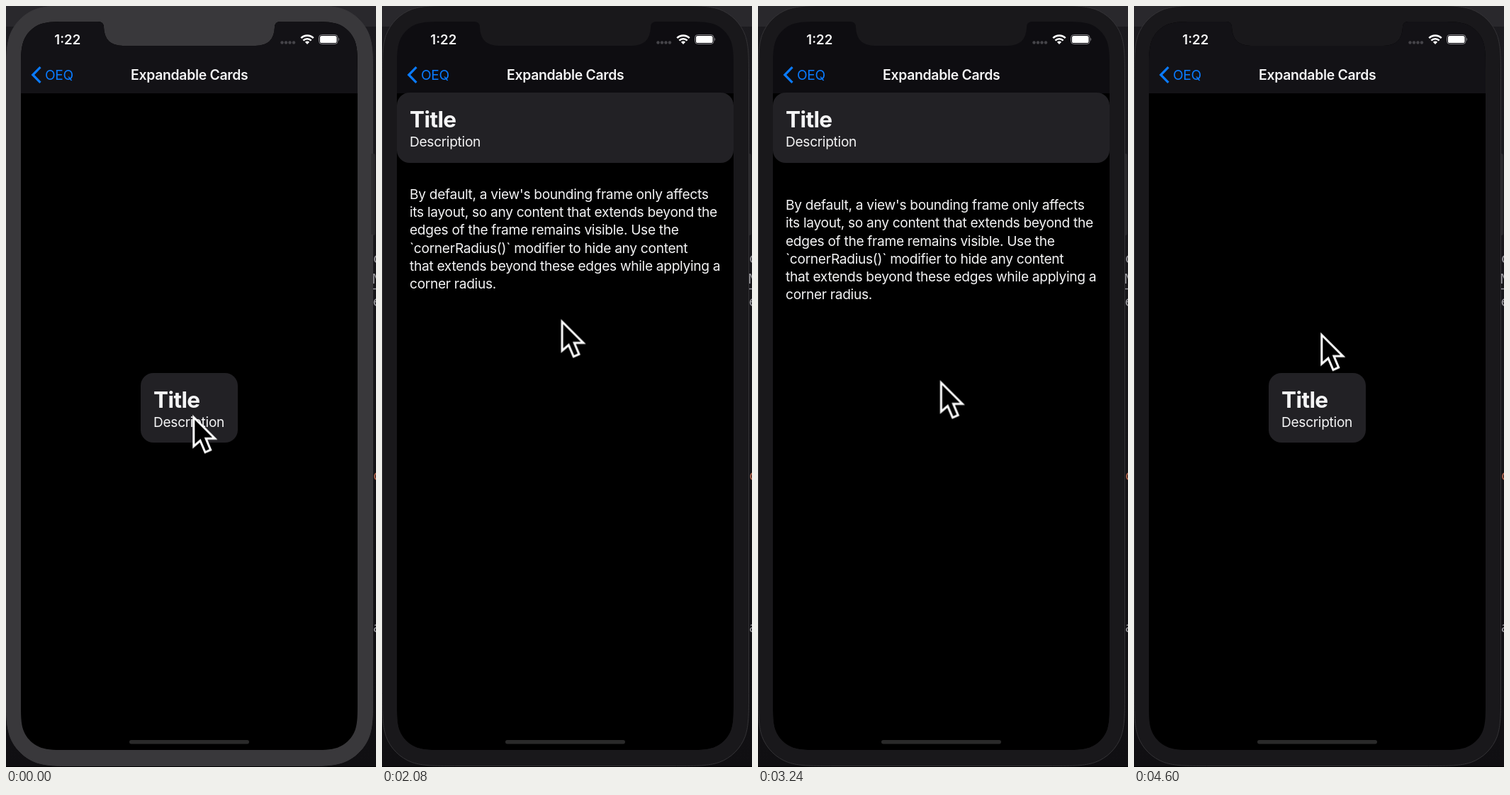
Animation of 522 by 1072 pixels, one loop 4720 ms. Source, as an HTML page:

```html
<!DOCTYPE html>
<html lang="en">
<head>
<meta charset="utf-8">
<title>Expandable Cards</title>
<style>
  html, body { margin: 0; width: 100%; height: 100%; overflow: hidden; background: #141316; }
  #stage { position: absolute; left: 0; top: 0; width: 522px; height: 1072px; overflow: hidden; }
  svg { position: absolute; left: 0; top: 0; display: block; }
  text { font-family: Inter, "Liberation Sans", sans-serif; font-size: 19.15px; letter-spacing: -.016em; fill: #f4f4f5; white-space: pre; }
  .semi { font-weight: 600; font-size: 19.4px; }
  .mono text { font-family: "Noto Sans Mono", "DejaVu Sans Mono", monospace; font-size: 20px; fill: #98979c; letter-spacing: 0; }

  .active, .card, .fade, .body, .cursor, .ring { animation: 4720ms linear infinite; }

  .active { animation-name: blur; animation-timing-function: step-end; }
  @keyframes blur { 0% { opacity: 1 } 11.01%, 100% { opacity: 0 } }

  .card { position: absolute; overflow: hidden; animation-name: expand; }
  .head { position: absolute; left: 0; top: 0; width: 100%; height: 98.5px; border-radius: 18px; background: #222125; }
  @keyframes expand {
    0%, 97.25%, 100% { left: 190px; top: 516.5px; width: 137px; height: 98.5px; }
    12.99% { left: 190px; top: 516.5px; width: 137px; height: 98.5px; animation-timing-function: ease-in-out; }
    20.4% { left: 21px; top: 122.3px; width: 475px; height: 925.7px; }
    89.83% { left: 21px; top: 122.3px; width: 475px; height: 925.7px; animation-timing-function: ease-in-out; }
  }

  .fade { animation-name: fade; }
  @keyframes fade {
    0%, 97.25%, 100% { opacity: 0; }
    12.99% { opacity: 0; animation-timing-function: ease-in-out; }
    20.4% { opacity: 1; }
    89.83% { opacity: 1; animation-timing-function: ease-in-out; }
  }

  /* rubber-band drag, then spring back */
  .body { animation-name: drag; }
  @keyframes drag {
    0%, 48.7% { transform: translateY(0); }
    51.69% { transform: translateY(-1.3px); animation-timing-function: cubic-bezier(.45, 0, .7, .9); }
    62.71% { transform: translateY(67.7px); }
    63.56% { transform: translateY(70px); animation-timing-function: linear(0, .25, .57, .78, .896, .952, .978, 1); }
    75.42%, 100% { transform: translateY(0); }
  }

  .cursor { animation-name: point; }
  @keyframes point {
    0% { transform: translate(263px, 575.3px); animation-timing-function: ease-in-out; }
    3.39% { transform: translate(251px, 574.5px); }
    27.97% { transform: translate(251px, 574.5px); animation-timing-function: ease-in; }
    31.36% { transform: translate(251px, 562.5px); animation-timing-function: cubic-bezier(.3, .2, .5, 1); }
    50.85% { transform: translate(252.5px, 419.5px); }
    51.69% { transform: translate(252.5px, 419.5px); animation-timing-function: cubic-bezier(.45, 0, .7, .9); }
    62.71% { transform: translate(252px, 565.5px); }
    63.56% { transform: translate(252.5px, 568px); animation-timing-function: ease-in-out; }
    75.42%, 100% { transform: translate(263px, 459.2px); }
  }

  .ring { animation-name: ripple; transform-origin: 245.5px 563.5px; }
  .ring circle { vector-effect: non-scaling-stroke; }
  @keyframes ripple {
    0%, 61.44% { opacity: 0; transform: scale(.5); }
    62.5% { opacity: 1; }
    62.71% { opacity: 1; transform: scale(1); }
    64.4%, 100% { opacity: 0; transform: scale(1.2); }
  }
</style>
</head>
<body>
<div id="stage">
  <svg width="522" height="1072" viewBox="0 0 522 1072">
    <defs>
      <linearGradient id="desk" x2="0" y2="1">
        <stop stop-color="#1c1b1f"/><stop offset="1" stop-color="#100f12"/>
      </linearGradient>
      <clipPath id="screen"><path id="glass" clip-rule="evenodd"/></clipPath>
    </defs>

    <!-- window behind the phone -->
    <rect width="522" height="1072" fill="url(#desk)"/>
    <rect width="522" height="29" fill="#29282c"/>
    <rect y="1071" width="522" height="1" fill="#000"/>
    <g class="mono">
      <text x="517.5" y="362">c</text>
      <text x="516.5" y="391">N</text>
      <text x="517.5" y="423">e</text>
      <text x="517.5" y="668" style="fill:#b5674f">c</text>
      <text x="517.5" y="882">a</text>
      <path d="M516 398.5H522" stroke="#98979c" stroke-width="1.5"/>
    </g>
    <rect x="514" y="208" width="7" height="115" rx="2" fill="#29282b"/>

    <!-- bezel -->
    <path class="bezel" fill="#19181b" stroke="#343336"/>
    <g class="active">
      <path class="bezel" fill="#39383b" stroke="#39383b"/>
      <path d="M516.5 208V322" stroke="#2b2a2d" stroke-width="2"/>
    </g>

    <!-- screen -->
    <g clip-path="url(#screen)">
      <rect x="21" y="22" width="475" height="1026" fill="#000"/>
      <rect x="21" y="22" width="475" height="101" fill="#131216"/>
      <rect class="fade" x="21" y="22" width="475" height="101" fill="#0e0d11"/>
    </g>

    <!-- status bar -->
    <text class="semi" x="68.3" y="53.7" style="font-size:18.6px;letter-spacing:0">1:22</text>
    <g fill="#454449">
      <circle cx="389.5" cy="51.5" r="2.2"/><circle cx="395" cy="51.5" r="2.2"/>
      <circle cx="400.5" cy="51.5" r="2.2"/><circle cx="406" cy="51.5" r="2.2"/>
    </g>
    <g fill="none" stroke="#fff" stroke-width="2.6">
      <path d="M416.3 45.2A12.3 12.3 0 0 1 433.7 45.2"/>
      <path d="M419.4 48.6A8 8 0 0 1 430.6 48.6"/>
    </g>
    <path d="M425 54L421.9 50.8A4.4 4.4 0 0 1 428.1 50.8Z" fill="#fff"/>
    <rect x="441.5" y="40.5" width="26.5" height="13" rx="4" fill="none" stroke="#858489"/>
    <rect x="443" y="42" width="23.5" height="10" rx="2.6" fill="#fff"/>
    <path d="M469.3 44.8Q471.2 47 469.3 49.2Z" fill="#858489"/>

    <!-- navigation bar -->
    <path d="M48.5 86.2L37.8 97L48.5 107.8" fill="none" stroke="#0a7bff" stroke-width="3.2"/>
    <text x="55" y="104" style="fill:#0a7bff">OEQ</text>
    <text class="semi" x="258.7" y="104" text-anchor="middle">Expandable Cards</text>
  </svg>

  <div class="card">
    <div class="head"></div>
    <svg width="475" height="926" viewBox="0 0 475 926">
      <text x="18" y="49.3" style="font-size:31.6px;font-weight:700;letter-spacing:-.02em">Title</text>
      <text x="18" y="75.7">Description</text>
      <g class="fade">
        <g class="body">
          <text x="18" y="149.9">By default, a view's bounding frame only affects</text>
          <text x="18" y="175.1">its layout, so any content that extends beyond the</text>
          <text x="18" y="200.3">edges of the frame remains visible. Use the</text>
          <text x="18" y="225.5">`cornerRadius()` modifier to hide any content</text>
          <text x="18" y="250.7">that extends beyond these edges while applying a</text>
          <text x="18" y="275.9">corner radius.</text>
        </g>
      </g>
    </svg>
  </div>

  <svg width="522" height="1072" viewBox="0 0 522 1072">
    <rect x="174" y="1034" width="169" height="5.5" rx="2.75" fill="#2a2a2a"/>
    <g class="ring" fill="none" stroke="#d8d8d8">
      <circle cx="245.5" cy="563.5" r="70.5"/>
      <circle cx="245.5" cy="563.5" r="67.5"/>
    </g>
    <path class="cursor" d="M1.8 4V45L11 37L18 53.3L25.7 50L19 34H31.8Z" fill="#000" stroke="#fff" stroke-width="3"/>
  </svg>
</div>
<script>
  // One continuous-curvature corner, in units of the radius, from the x edge to the y edge.
  const CORNER = [
    [1.529, 0], [1.088, 0], [.868, 0], [.631, .075], [.373, .169],
    [.169, .373], [.075, .631], [0, .868], [0, 1.088], [0, 1.529]
  ];

  function squircle(x, y, w, h, r) {
    const corner = (cx, cy, dx, dy) => {
      const pts = dx === dy ? [...CORNER].reverse() : CORNER;
      const [start, ...curve] = pts.map(([a, b]) => `${cx + dx * a * r} ${cy + dy * b * r}`);
      return `${start}C${curve.join(" ")}`;
    };
    return "M" + [
      corner(x, y, 1, 1),
      corner(x + w, y, -1, 1),
      corner(x + w, y + h, -1, -1),
      corner(x, y + h, 1, -1)
    ].join("L") + "Z";
  }

  const notch = "M130 22Q138 22 138 30Q139 56 165 56H352Q378 56 379 30Q379 22 387 22Z";
  document.getElementById("glass").setAttribute("d", squircle(21, 22, 475, 1026, 44.7) + notch);
  for (const el of document.querySelectorAll(".bezel")) {
    el.setAttribute("d", squircle(.5, -.5, 517, 1071, 66.6));
  }
</script>
</body>
</html>
```
